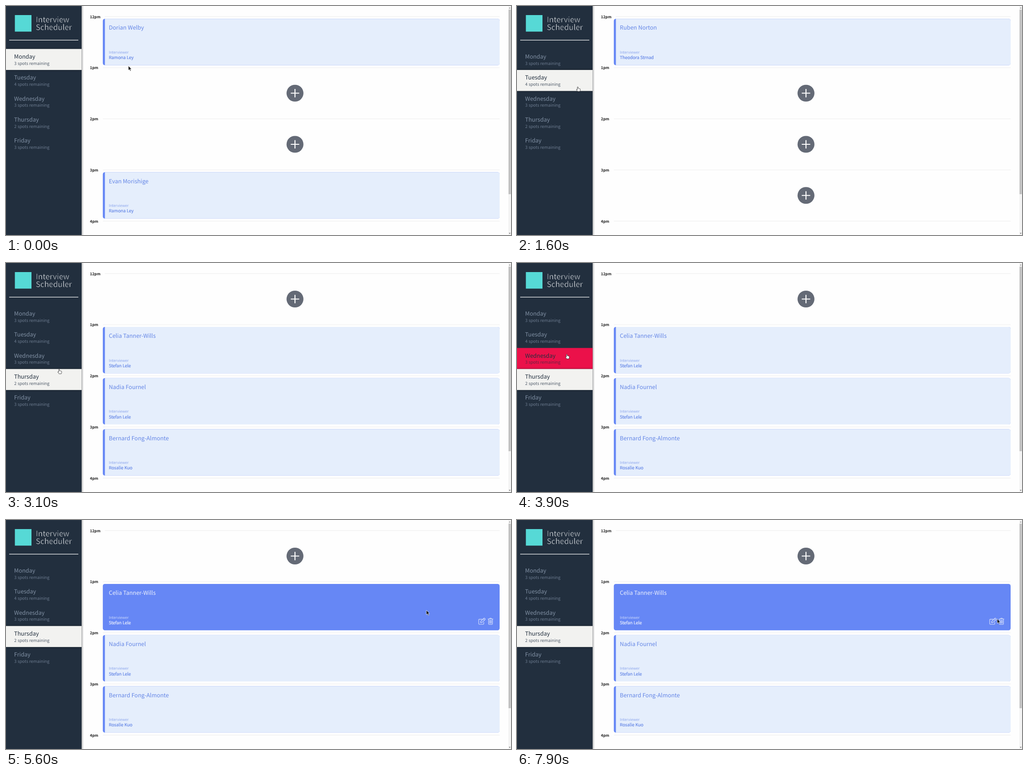
An HTML page for the animation above (8000 ms loop, 1110 px wide and 505 px high).

```html
<!DOCTYPE html>
<html lang="en">
<head>
<meta charset="utf-8">
<title>Interview Scheduler</title>
<style>
  html, body { margin: 0; width: 100%; height: 100%; overflow: hidden; background: #fefefe; }
  svg { display: block; }
  text {
    font-family: "Noto Sans CJK JP", "Noto Sans CJK SC", "Noto Sans CJK", "Open Sans", sans-serif;
    text-rendering: geometricPrecision;
    white-space: pre;
  }
  /* A stroke in the background colour thins the letters. */
  .brand { font-size: 16.8px; font-weight: 200; fill: #e8ebee; stroke: #222f3e; stroke-width: .5; }
  .day { font-size: 12.45px; fill: #8090a4; }
  .spots { font-size: 9.4px; font-weight: 300; fill: #6c7b8f; }
  .row rect { fill: none; }
  .row.selected rect { fill: #f2f2f0; filter: drop-shadow(0 0 2px rgba(0, 0, 0, .4)); }
  .row.hover rect { fill: #eb114a; }
  .selected .day, .hover .day { fill: #222f3e; }
  .selected .spots { fill: #505b69; }
  .hover .spots { fill: #222f3e; fill-opacity: .65; }
  .hour { font-size: 8.28px; font-weight: 700; fill: #1b1b1b; }
  .edge { fill: #6687f5; }
  .face { fill: #e5eefc; }
  .student { font-size: 12.45px; fill: #6486e6; }
  .label { font-size: 8.15px; font-weight: 300; fill: #8aa4ec; }
  .staff { font-size: 9.5px; font-weight: 500; fill: #6486e6; stroke: #6486e6; stroke-width: .22; }
  .icons { fill: none; stroke: #dbe3fb; stroke-width: 1.1; stroke-linejoin: round; stroke-linecap: round; display: none; }
  .card.hover .face { fill: none; }
  .card.hover .icons { display: inline; }
  .card.hover .student { fill: #eef2fd; }
  .card.hover .staff { fill: #eef2fd; stroke: #eef2fd; }
  .card.hover .label { fill: #cdd9fb; }
</style>
</head>
<body>
<svg width="100%" height="100%" viewBox="0 0 1110 505" preserveAspectRatio="none">
  <defs>
    <linearGradient id="shade">
      <stop offset="0" stop-color="#000" stop-opacity=".26"/>
      <stop offset="1" stop-color="#000" stop-opacity="0"/>
    </linearGradient>
  </defs>
  <rect width="1110" height="505" fill="#fefefe"/>
  <rect x="166" width="5" height="505" fill="url(#shade)"/>

  <svg width="166.5" height="505">
    <rect width="166.5" height="505" fill="#222f3e"/>
    <rect x="19.5" y="20" width="36.5" height="36.5" fill="#56d9d6"/>
    <text class="brand" x="65.6" y="36.3">Interview</text>
    <text class="brand" x="65.6" y="53">Scheduler</text>
    <rect x="7" y="74.7" width="152" height="1.2" fill="#fff"/>
    <g id="rows"></g>
  </svg>

  <g id="hours"></g>
  <g id="slots"></g>

  <rect x="1104" width="6" height="505" fill="#f4f4f4"/>
  <rect x="1104.6" y="8" width="5" height="407" fill="#c1c1c1"/>
  <path d="M1105.3 5.2h3.6l-1.8-2.2z" fill="#808080"/>
  <path d="M1105.3 500.4h3.6l-1.8 2.2z" fill="#505050"/>

  <g id="cursor">
    <path id="arrow" d="M0 0V9.9L2.3 7.8L4 11.4L5.6 10.7L4 7.2H7Z" fill="#111" stroke="#fff" stroke-width=".7"/>
    <path id="hand" d="M-.9 .8Q0 -.5 .9 .8V3.6Q2 3 2.6 4Q3.7 3.5 4.2 4.5Q5.4 4.2 5.5 5.5V7.6Q5.4 8.8 4.6 10.3H-.4Q-1.2 8.6 -3 6.6Q-3.2 5 -.9 6.4Z"
      fill="#fff" stroke="#222" stroke-width=".8"/>
  </g>
</svg>

<script>
const LOOP = 8000, STEP = 100;
const SIDE = 166.5, ROW_TOP = 94.7, ROW_H = 46.35;
const SLOT_TOP = 28.3, SLOT_GAP = 112.75, CARD_H = 102.2, LEFT = 212.8, RIGHT = 1085;

const days = [["Monday", 3], ["Tuesday", 4], ["Wednesday", 3], ["Thursday", 2], ["Friday", 3]];
const booked = {
  0: [["Dorian Welby", "Ramona Ley"], null, null, ["Evan Morishige", "Ramona Ley"]],
  1: [["Ruben Norton", "Theodora Strnad"], null, null, null],
  3: [null, ["Celia Tanner-Wills", "Stefan Lele"], ["Nadia Fournel", "Stefan Lele"], ["Bernard Fong-Almonte", "Rosalie Kuo"]]
};

// Pointer moves: start time, number of steps, end point.
const start = [269, 132];
const moves = [
  [800, 6, 133.5, 178],
  [2200, 6, 116.8, 234],
  [3500, 5, 109.5, 201],
  [5000, 3, 626, 157],
  [5400, 1, 872, 185],
  [5600, 1, 924, 199],
  [5900, 5, 1061.5, 221],
  [6400, 3, 1055.5, 218]
];
const LEAVE = 4900;

const $ = id => document.getElementById(id);
const text = (cls, x, y, s) => `<text class="${cls}" x="${x}" y="${y}">${s}</text>`;
const slotY = i => SLOT_TOP + i * SLOT_GAP;
const ease = p => p * p * (3 - 2 * p);

function card(y, [student, staff]) {
  const inner = LEFT + 4.6, r = 4.5;
  return `<g class="card" transform="translate(0 ${y})">
    <rect class="edge" x="${LEFT}" width="${RIGHT - LEFT}" height="${CARD_H}" rx="${r}"/>
    <path class="face" d="M${inner} 0H${RIGHT - r}q${r} 0 ${r} ${r}V${CARD_H - r}q0 ${r} ${-r} ${r}H${inner}Z"/>
    ${text("student", 226, 24.2, student)}
    ${text("label", 226, 76.6, "Interviewer")}
    ${text("staff", 226, 88.8, staff)}
    <g class="icons" transform="translate(1038 74.8)">
      <path d="M8.5 3H2.2Q1 3 1 4.2V13Q1 14.2 2.2 14.2H11Q12.2 14.2 12.2 13V9.5"/>
      <path d="M5 10.6L5.3 7.9L12.3 .9Q13.1 .2 13.9 .9L15.1 2.1Q15.8 2.9 15.1 3.7L8 10.3ZM11 2.3L13.7 5"/>
      <path d="M21.5 2.4H32.5M24.6 2.2L25.6 .6H28.4L29.4 2.2M22.6 2.6V13Q22.6 14.4 24 14.4H30Q31.4 14.4 31.4 13V2.6M25 5V12M27 5V12M29 5V12"/>
    </g>
  </g>`;
}

function addButton(y) {
  return `<g transform="translate(635.2 ${y + 51.2})">
    <circle r="18.6" fill="#646a76"/>
    <path d="M-9.3 0H9.3M0 -9.3V9.3" stroke="#fff" stroke-width="2.2"/>
  </g>`;
}

$("rows").innerHTML = days.map(([name, n], i) => {
  const y = ROW_TOP + i * ROW_H;
  return `<g class="row"><rect y="${y}" width="${SIDE}" height="${ROW_H}"/>
    ${text("day", 17.8, y + 21.1, name)}${text("spots", 18.1, y + 34.8, n + " spots remaining")}</g>`;
}).join("");

$("hours").innerHTML = ["12pm", "1pm", "2pm", "3pm", "4pm"].map((label, i) => {
  const y = slotY(i) - 5.1, x = i ? LEFT : 217;
  return text("hour", 184.6, y + 3.4, label) +
    `<rect x="${x}" y="${y - .3}" width="${RIGHT - x}" height=".8" fill="#e9e9e9"/>`;
}).join("");

function pointerAt(t) {
  let [x, y] = start;
  for (const [from, steps, toX, toY] of moves) {
    if (t < from) break;
    const p = ease(Math.min(1, (Math.floor((t - from) / STEP) + 1) / steps));
    x += (toX - x) * p;
    y += (toY - y) * p;
  }
  return [x, y];
}

let shownDay = -1;

function render(t) {
  const day = t < 1600 ? 0 : t < 3100 ? 1 : 3;
  const [x, y] = pointerAt(t);

  if (day !== shownDay) {
    $("slots").innerHTML = booked[day].map((b, i) => b ? card(slotY(i), b) : addButton(slotY(i))).join("");
    shownDay = day;
  }

  const row = x < SIDE && t < LEAVE ? Math.floor((y - ROW_TOP) / ROW_H) : -1;
  [...$("rows").children].forEach((el, i) => {
    el.classList.toggle("selected", i === day);
    el.classList.toggle("hover", i === row && i !== day);
  });

  [...$("slots").children].forEach((el, i) => {
    const top = slotY(i);
    el.classList.toggle("hover", x > LEFT && x < RIGHT && y > top && y < top + CARD_H);
  });

  const onRow = row >= 0 && row < days.length;
  $("hand").style.display = onRow ? "inline" : "none";
  $("arrow").style.display = onRow ? "none" : "inline";
  $("cursor").setAttribute("transform", `translate(${x} ${y})`);
}

function tick() {
  render(performance.now() % LOOP);
  requestAnimationFrame(tick);
}
tick();
</script>
</body>
</html>
```
